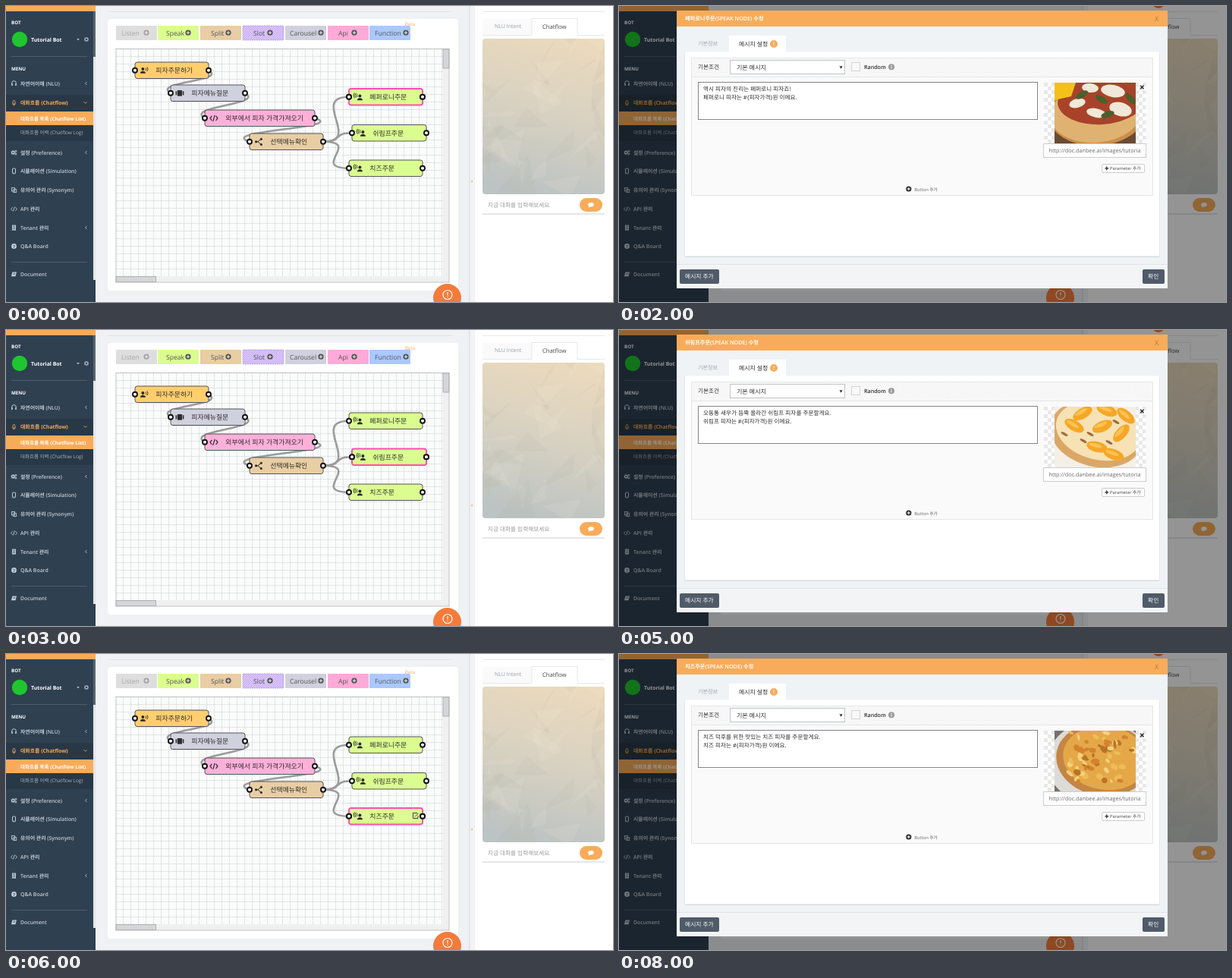
An HTML page that plays this animation: 800x390 px, repeating every 9000 ms.

```html
<!DOCTYPE html>
<html lang="ko">
<head>
<meta charset="utf-8">
<title>Chatflow</title>
<style>
html, body { margin: 0; width: 100%; height: 100%; overflow: hidden; background: #eff1f4; }
svg { display: block; width: 800px; height: 390px; }
text { font-family: 'Open Sans', 'Noto Sans CJK KR', 'Noto Sans CJK', sans-serif; text-rendering: geometricPrecision; white-space: pre; }
</style>
</head>
<body>
<svg id="stage" viewBox="0 0 800 390" xmlns="http://www.w3.org/2000/svg"></svg>
<script>
const ORANGE = '#f8ac59', GREEN = '#dbfd90', INK = '#2b2b2b', MUTED = '#a7b1c2';

const rect = (x, y, w, h, fill, extra = '') => `<rect x="${x}" y="${y}" width="${w}" height="${h}" fill="${fill}" ${extra}/>`;
const circle = (x, y, r, fill, extra = '') => `<circle cx="${x}" cy="${y}" r="${r}" fill="${fill}" ${extra}/>`;
const oval = (x, y, rx, ry, fill, turn = 0) => `<ellipse cx="${x}" cy="${y}" rx="${rx}" ry="${ry}" fill="${fill}" transform="rotate(${turn} ${x} ${y})"/>`;
const line = (d, color, w = 1, extra = '') => `<path d="${d}" fill="none" stroke="${color}" stroke-width="${w}" ${extra}/>`;
const shape = (d, fill, extra = '') => `<path d="${d}" fill="${fill}" ${extra}/>`;
const text = (x, y, s, size, fill = INK, weight = 400, extra = '') =>
  `<text x="${x}" y="${y}" font-size="${size}" fill="${fill}" font-weight="${weight}" ${extra}>${s}</text>`;
const at = (x, y, body) => `<g transform="translate(${x} ${y})">${body}</g>`;
const range = n => Array.from({ length: n }, (_, i) => i);

function seeded(seed) {
  return () => (seed = (seed * 16807) % 2147483647) / 2147483647;
}

// Icons are centred on 0,0
const icon = {
  head: c => line('M-2.8 1V-.5A2.8 2.8 0 0 1 2.8-.5V1', c) + rect(-3.3, 0, 1.6, 3, c) + rect(1.7, 0, 1.6, 3, c),
  flow: c => line('M0-3.5C-3 0-2 3 0 3S3 0 0-3.5M0 0V3', c, .9),
  gears: c => circle(-1.2, 0, 1.8, 'none', `stroke="${c}" stroke-width="1.5"`) + circle(2.4, -1.7, 1, 'none', `stroke="${c}"`) + circle(2.4, 2, 1, 'none', `stroke="${c}"`),
  phone: c => rect(-2, -3.4, 4, 6.8, 'none', `rx=".8" stroke="${c}"`) + circle(0, 2.2, .5, c),
  copy: c => rect(-3, -3, 4, 4.4, 'none', `stroke="${c}" stroke-width=".9"`) + rect(-.7, -.9, 3.8, 4, 'none', `stroke="${c}" stroke-width=".9"`),
  code: c => line('M-2-2.2L-4 0L-2 2.2M2-2.2L4 0L2 2.2M.9-3L-.9 3', c, .9),
  tower: c => rect(-2.5, -3.4, 5, 7, c) + line('M-1.5-1.8H1.5M-1.5 0H1.5M-1.5 1.7H1.5', '#2f4050', .7),
  help: c => circle(0, 0, 3.4, c) + text(0, 2, '?', 5.5, '#2f4050', 700, 'text-anchor="middle"'),
  book: c => shape('M-2-3H3.5L2 2.8H-3.6Z', c) + line('M-.8-1.4H1.8M-1.2 0H1.4', '#2f4050', .6),
  plus: (c, r = 3.6, ink = '#fff') => circle(0, 0, r, c) + line(`M${-r * .58} 0H${r * .58}M0 ${-r * .58}V${r * .58}`, ink, r * .29),
  listen: c => circle(-1.6, -1.8, 2, c) + shape('M-5.2 4C-5.2 0 2 0 2 4Z', c) + line('M2-3.2Q3.6-1.6 2 .2M3.8-4.4Q6.4-1.6 3.8 1.4', c, .9),
  slides: c => rect(-3, -3.8, 6, 7.6, c) + rect(-5.4, -2.6, 1.6, 5.2, c) + rect(3.8, -2.6, 1.6, 5.2, c),
  api: c => line('M-2.6-3L-5 0L-2.6 3M2.6-3L5 0L2.6 3M1.2-4L-1.2 4', c, 1.2),
  split: c => line('M-3 0H-1L3-3.4M-1 0L3 3.4', c, 1) + circle(-3.4, 0, 1.6, c) + circle(3.4, -3.6, 1.5, c) + circle(3.4, 3.6, 1.5, c),
  speak: c => circle(2.4, -1.2, 2, c) + shape('M-1.2 4.4C-1.2 .4 6 .4 6 4.4Z', c) + line('M-1-4Q-2.6-2.2-1 0M-2.8-5Q-5.2-2.2-2.8 1M-4.6-5.4Q-7.4-2.2-4.6 1.6', c, .9),
  edit: c => line('M3 0V3.5H-3.5V-3.5H2M-1 1.4L3.5-3.2', c, .9),
  chat: c => oval(0, -.3, 3.8, 2.8, c) + shape('M-2.5 1L-3.4 3.4L.4 2Z', c)
};

const defs = `<defs>
<pattern id="grid" x="145" y="57" width="10" height="10" patternUnits="userSpaceOnUse">
  ${line('M9.5 0V10M0 9.5H10', '#cfd0d1', .8, 'stroke-dasharray="1.6 .9"')}</pattern>
<pattern id="hatch" width="3" height="3" patternUnits="userSpaceOnUse">
  ${rect(0, 0, 3, 3, '#d9c3fa') + line('M-1 1L1-1M0 3L3 0M2 4L4 2', '#c5aceb', .8)}</pattern>
<pattern id="faint" width="3" height="3" patternUnits="userSpaceOnUse">
  ${rect(0, 0, 3, 3, '#f9f9f9') + line('M-1 1L1-1M0 3L3 0M2 4L4 2', '#f0f0f0', .7)}</pattern>
<pattern id="checker" x="560" y="101" width="10" height="10" patternUnits="userSpaceOnUse">
  ${rect(0, 0, 10, 10, '#fff') + rect(0, 0, 5, 5, '#e8e8e8') + rect(5, 5, 5, 5, '#e8e8e8')}</pattern>
<linearGradient id="sand" x1=".6" y1="0" x2=".4" y2="1">
  <stop offset="0" stop-color="#ead9bd"/><stop offset=".45" stop-color="#d9d2c1"/><stop offset="1" stop-color="#bcc3c3"/></linearGradient>
<clipPath id="chatClip">${rect(628, 43, 161, 205, '#000', 'rx="4"')}</clipPath>
<clipPath id="photoClip">${rect(574, 101, 107, 80, '#000')}</clipPath>
</defs>`;

function sidebar() {
  const pale = '#c3ccd8';
  const items = [
    [102, 'head', '자연어이해 (NLU)', 1], [193, 'gears', '설정 (Preference)', 1],
    [217.5, 'phone', '시뮬레이션 (Simulation)'], [242.5, 'copy', '유의어 관리 (Synonym)'],
    [267.5, 'code', 'API 관리'], [292, 'tower', 'Tenant 관리', 1],
    [316.5, 'help', 'Q&amp;A Board'], [353.5, 'book', 'Document']
  ];
  const rows = items.map(([y, name, label, more]) =>
    at(10.5, y, icon[name](pale)) + text(19, y + 2.6, label, 6.9, pale, 600) +
    (more ? line(`M106.5 ${y - 2}L104.5 ${y}L106.5 ${y + 2}`, pale, .8) : '')).join('');
  return rect(0, 0, 118, 390, '#2f4050') + rect(0, 0, 118, 7, ORANGE) +
    rect(0, 117, 118, 61, '#293846') + rect(0, 139, 118, 18, ORANGE) +
    rect(115, 7, 3, 354, '#e3e5e8') + rect(115, 7, 3, 60, '#596473') +
    text(7, 24.3, 'BOT', 6.2, '#fff', 700) + circle(18, 44, 10.2, '#1fc62f') +
    text(33, 46.8, 'Tutorial Bot', 6.9, '#fff', 700) +
    shape('M93 43H97L95 45.4Z', MUTED) + circle(106, 44, 2, 'none', `stroke="${MUTED}" stroke-width="1.5"`) +
    line('M7 66.5H107M7 337.5H107', '#566473', .8) + text(7, 85.3, 'MENU', 6.2, '#fff', 700) +
    at(10.5, 127.5, icon.flow(ORANGE)) + text(19, 130, '대화흐름 (Chatflow)', 6.9, ORANGE, 700) +
    line('M102.5 126.3L104.5 128.3L106.5 126.3', ORANGE, .8) +
    text(19, 150.7, '대화흐름 목록 (Chatflow List)', 6.5, '#fff', 700) +
    text(19, 169.4, '대화흐름 이력 (Chatflow Log)', 6.5, MUTED) + rows;
}

function toolbar() {
  const buttons = [
    [145, 152, 185, 'Listen', '#dedede', '#a5a5a5'], [200, 211, 240, 'Speak', GREEN],
    [256, 270, 293, 'Split', '#e9cda3'], [312, 326, 348, 'Slot', 'url(#hatch)'],
    [368, 374, 415, 'Carousel', '#d0d0de'], [424, 438, 459, 'Api', '#ffaad8'],
    [479, 486, 527, 'Function', '#abc8ff']
  ];
  return buttons.map(([x, tx, ix, label, fill, ink = '#555']) =>
    rect(x, 26, 54, 19, fill, label === 'Slot' ? 'rx="1" stroke="#a88bd8" stroke-width=".7" stroke-dasharray="2 1"' : 'rx="1"') +
    text(tx, 38.6, label, 8.6, ink) + at(ix, 35.2, icon.plus(ink, 3.6, '#eee'))).join('') +
    text(526, 26.3, 'Beta', 6.2, ORANGE);
}

const nodes = [
  [170, 74, 97, '#ffcf6e', 'listen', '피자주문하기'],
  [217, 104, 98, '#d0d1de', 'slides', '피자메뉴질문'],
  [262, 137, 145, '#ffb0da', 'api', '외부에서 피자 가격가져오기'],
  [321, 168, 97, '#e9cea4', 'split', '선택메뉴확인'],
  [452, 109, 97, GREEN, 'speak', '페퍼로니주문'],
  [456, 156.5, 98, GREEN, 'speak', '쉬림프주문'],
  [452, 203, 97, GREEN, 'speak', '치즈주문']
];

const ports = (x, w, mid) => [x, x + w].map(px => circle(px, mid, 3, '#fff', 'stroke="#111" stroke-width="1.9"')).join('');

function drawNode([x, y, w, fill, name, label]) {
  const mid = y + 10.8;
  return rect(x, y, w, 21.5, fill, 'rx="3" stroke="#555" stroke-width="1"') +
    at(x + 12, mid, icon[name](INK)) + text(x + 27.3, mid + 3.2, label, 8.9) + ports(x, w, mid);
}

function ring(i) {
  const [x, y, w] = nodes[i + 4], mid = y + 10.8;
  return `<g id="ring${i}">` + rect(x, y, w, 21.5, 'none', 'rx="3" stroke="#ff4fb0" stroke-width="1.8"') +
    ports(x, w, mid) + (i === 2 ? at(540, mid - .8, icon.edit(INK)) : '') + '</g>';
}

function board() {
  const wires = [
    'M267 85C292 99 192 100 217 114.8', 'M315 114.8C342 130 235 132 262 147.8',
    'M407 147.8C452 161 276 164 321 178.8', 'M418 178.8C470 179 400 120 452 119.8',
    'M418 178.8C444 179 430 167 456 167.3', 'M418 178.8C470 179 400 213 452 213.8'
  ];
  return rect(134, 17, 462, 358, '#fff', 'rx="4"') + toolbar() +
    rect(145, 56.5, 439, 307.5, '#fafbfb') + rect(145, 56.5, 431, 299.5, 'url(#grid)') +
    rect(576, 56.5, 8, 299.5, '#f0f0f0') + rect(145, 356, 439, 8, '#f0f0f0') +
    rect(576, 57, 8, 25, '#d5d6d8', 'stroke="#999" stroke-width=".7"') +
    rect(145, 356.5, 52.5, 7, '#d5d6d8', 'stroke="#999" stroke-width=".7"') +
    rect(145, 56.5, 439, 307.5, 'none', 'stroke="#b5b5b5" stroke-width=".8"') +
    wires.map(d => line(d, '#9b9b9b', 2.6)).join('') + nodes.map(drawNode).join('') + range(3).map(ring).join('');
}

function chatPanel() {
  const rnd = seeded(71);
  const facets = range(36).map(() => {
    const x = 620 + rnd() * 165, y = 38 + rnd() * 200;
    const p = () => `${(x + rnd() * 70 - 30).toFixed(1)} ${(y + rnd() * 70 - 30).toFixed(1)}`;
    return shape(`M${p()}L${p()}L${p()}Z`, rnd() > .5 ? '#fff3d8' : '#a8a595', 'opacity=".09"');
  }).join('');
  return rect(611, 0, 6, 390, '#f3f4f6') + rect(617, 0, 183, 390, '#fff') + line('M611 0V390', '#d5d8dc') +
    line('M617.5 0V390', '#e8eaec', .7) + shape('M612.5 231L614.8 229.5V232.5Z', ORANGE) +
    line('M628 7.5H789', '#e2e4e6', .8) + rect(628, 17, 65, 21, '#fafafa') +
    line('M628 38.5H693V16.5H753V38.5H789', '#e0e2e5', .8) +
    text(644, 29.4, 'NLU Intent', 7, '#9a9fa6') + text(707, 29.8, 'Chatflow', 7.7, '#444') +
    `<g clip-path="url(#chatClip)">${rect(628, 43, 161, 205, 'url(#sand)') + facets}</g>` +
    text(635, 264.6, '지금 대화를 입력해보세요', 7.65, '#999') + line('M628 274H789', '#bfc2c6', .8) +
    rect(756, 253, 30, 18, ORANGE, 'rx="9"') + at(771, 262, icon.chat('#fff'));
}

function page() {
  return rect(0, 0, 800, 390, '#eff1f4') + line('M134 7.5H588', '#dcdfe3', .8) + sidebar() + board() + chatPanel() +
    circle(581.5, 384.5, 18.5, '#f47b3a') + circle(582, 380.5, 6, 'none', 'stroke="#fff" stroke-width="1.2"') +
    line('M582 377V381.2M582 382.4V383.8', '#fff', 1.2);
}

const photos = [
  () => rect(574, 101, 107, 80, '#6b4a33') + oval(630, 138, 66, 46, '#c98f4b', -4) + oval(628, 142, 60, 38, '#e0b272', -4) +
    oval(636, 124, 58, 32, '#a8432a', -4) + shape('M574 101H602L596 119L574 124Z', '#f2c21b') +
    [[604, 128, 11, 6, -15], [651, 112, 16, 8, 10], [661, 136, 15, 9, 15], [621, 108, 11, 6, 5], [629, 141, 13, 6, 12]]
      .map(([x, y, a, b, r]) => oval(x, y, a, b, '#f0e8d8', r)).join('') +
    [[636, 123, 30], [610, 117, -30], [644, 143, -18], [674, 122, 50]].map(([x, y, r]) => oval(x, y, 9, 4, '#4a5f2c', r)).join(''),
  () => rect(574, 101, 107, 80, '#f4f0e8') + oval(629, 137, 62, 43, '#dba766', 14) + oval(632, 133, 57, 38, '#f6e2b4', 14) +
    [[611, 110, -30], [643, 106, 20], [600, 126, 30], [637, 127, -24], [662, 136, -48], [630, 154, 14], [668, 113, 40], [652, 164, 20]]
      .map(([x, y, r]) => oval(x, y, 14, 7, '#f5a728', r) + oval(x - 2, y - 2, 9, 2.5, '#ffc252', r)).join('') +
    [[621, 137], [646, 148], [587, 137], [655, 121], [612, 146]].map(([x, y]) => oval(x, y, 5, 1.6, '#a06a3c', 30)).join(''),
  () => {
    const rnd = seeded(29);
    return rect(574, 101, 107, 80, '#77706a') + oval(632, 143, 68, 56, '#dddbd7') + oval(638, 139, 62, 48, '#c38644', 8) +
      oval(641, 137, 56, 42, '#e5a848', 8) + range(60).map(i => oval(594 + rnd() * 86, 102 + rnd() * 68, 2 + rnd() * 4, 1.5 + rnd() * 2.5,
        ['#f4d27c', '#d4822f', '#eebc5a', '#b97328'][i % 4], rnd() * 90)).join('');
  }
];

const scenes = [
  ['페퍼로니주문', '역시 피자의 진리는 페퍼로니 피자죠!', '페퍼로니 피자는 #{피자가격}원 이에요.'],
  ['쉬림프주문', '오동통 새우가 듬뿍 올라간 쉬림프 피자를 주문할게요.', '쉬림프 피자는 #{피자가격}원 이에요.'],
  ['치즈주문', '치즈 덕후를 위한 맛있는 치즈 피자를 주문할게요.', '치즈 피자는 #{피자가격}원 이에요.']
];

function dialog() {
  const button = (x, w, s) => rect(x, 347, w, 19, '#4f5b69', 'rx="2"') + text(x + 7, 359.4, s, 7.75, '#fff', 500);
  const content = scenes.map(([name, first, second], i) => `<g id="scene${i}">` +
    text(87, 19.2, `${name}(SPEAK NODE) 수정`, 7.2, '#fff', 600) + text(111, 112.2, first, 7.65) +
    `<g id="more${i}">${text(111, 123.2, second, 7.6)}</g>` +
    `<g clip-path="url(#photoClip)">${photos[i]()}</g></g>`).join('');
  return circle(711, -6, 9, '#f47b3a') + rect(0, 0, 800, 390, '#000', 'opacity=".42"') +
    rect(76, 6, 647, 366, '#f0f3f5') + rect(76, 6, 647, 21, ORANGE) +
    text(706, 19.6, 'X', 9, '#b97c3b') + rect(76, 341, 647, 31, '#f2f4f6') + line('M76 340.5H723', '#dfe2e6', .8) +
    rect(86.5, 61, 626, 270, '#d9dde2', 'rx="1"') + rect(87, 60.5, 625, 269, '#fff') + rect(145, 39, 75, 23, '#fff') +
    text(104, 52.3, '기본정보', 7.1, '#a0a5ad') + text(158, 52.6, '메시지 설정', 7.9) +
    circle(204, 50, 5, ORANGE) + line('M204 47.3V50.7M204 51.6V52.7', '#fff', .9) +
    rect(95.5, 68.5, 608, 181, '#fafafa', 'stroke="#e4e6e8"') +
    rect(96, 69, 607, 24, 'url(#faint)') + line('M96 93.5H703', '#e4e6e8') +
    text(104, 83.4, '기본조건', 7.6) + rect(146.5, 71.5, 151, 18, '#fff', 'stroke="#c2c4c6"') +
    text(155, 83.5, '기본 메시지', 8) + shape('M290.6 79.3H294.6L292.6 82.8Z', INK) +
    rect(306.5, 74.5, 11, 11, '#f9f9f9', 'stroke="#d4d4d4"') + text(323, 82.8, 'Random', 7.1, INK, 600) +
    circle(359, 80.2, 4, '#999') + line('M359 77.8V78.9M359 79.7V82.6', '#fff', 1.1) +
    rect(104.5, 100.5, 447, 49, '#fff', 'id="field"') +
    rect(560, 101, 134.5, 80, 'url(#checker)') + content +
    line('M687.2 104.8L691.6 109.2M691.6 104.8L687.2 109.2', INK, 1.5) +
    rect(559.5, 181.5, 135, 18, '#fff', 'stroke="#ccc"') +
    text(566.5, 193, 'http://doc.danbee.ai/images/tutoria', 7.25, '#666') +
    rect(636.5, 208.5, 56, 11, '#fff', 'rx="1.5" stroke="#ccc"') +
    line('M640.4 213.8H645.2M642.8 211.4V216.2', INK, 1.3) + text(647, 216, 'Parameter 추가', 5.8, '#444') +
    at(381.8, 241, icon.plus(INK, 3.6)) + text(389.3, 243.5, 'Button 추가', 5.8, '#666') +
    button(80, 52, '메시지 추가') + button(690, 29, '확인');
}

document.getElementById('stage').innerHTML = defs + page() + `<g id="dialog">${dialog()}</g>`;

const el = id => document.getElementById(id);
const show = (id, on) => el(id).setAttribute('display', on ? 'inline' : 'none');

// Each scene lasts three seconds: board, first line, both lines
function render(ms) {
  const step = Math.floor(ms / 1000) % 9, scene = Math.floor(step / 3), phase = step % 3;
  show('dialog', phase > 0);
  for (const i of range(3)) {
    show('ring' + i, i === scene && phase === 0);
    show('scene' + i, i === scene);
    show('more' + i, i === scene && phase === 2);
  }
  el('field').setAttribute('stroke', step === 1 ? '#c4c4c4' : '#858585');
}

const start = performance.now();
function tick() {
  render(performance.now() - start);
  requestAnimationFrame(tick);
}
tick();
</script>
</body>
</html>
```
